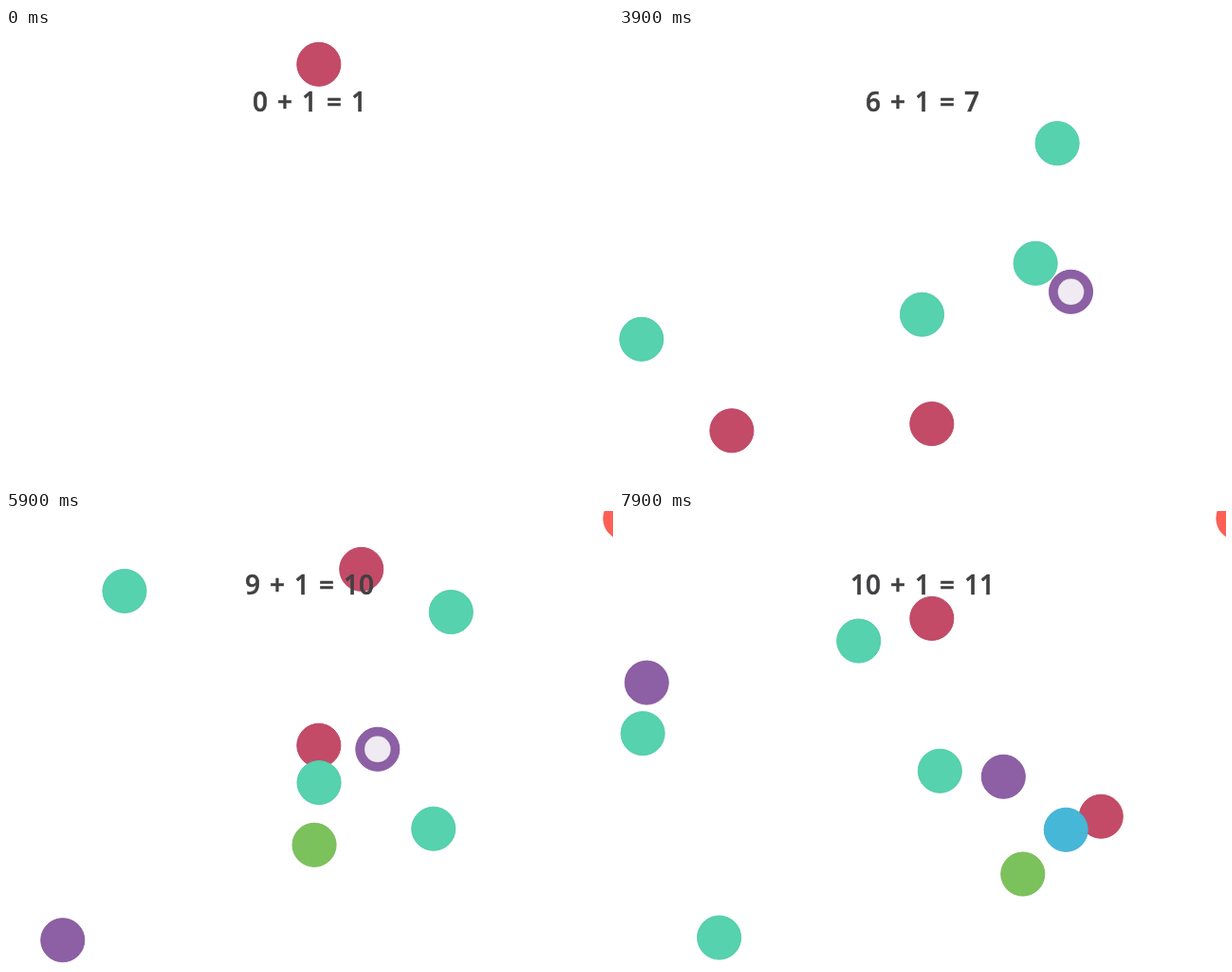
These frames come from a looping animation (640x480 px, 8 s). An HTML page with a canvas:

```html
<!DOCTYPE html>
<html lang="en">
<head>
<meta charset="utf-8">
<title>Counting balls</title>
<style>
  html, body { margin: 0; width: 100%; height: 100%; overflow: hidden; background: #fff; }
  canvas { display: block; }
</style>
</head>
<body>
<canvas id="stage" width="640" height="480"></canvas>
<script>
const ctx = document.getElementById('stage').getContext('2d');
const LOOP = 8000, STEP = 100;
const R = 23.5, EDGE = 23.3, ROOM_W = 594, ROOM_H = 434;
const DRAG = 0.012;   // share of speed lost per step
const HOLD = 1.5;     // steps between touching down and letting go
const CRIMSON = '#c34b68', TEAL = '#56d2ae', PURPLE = '#8d5fa5',
      LIME = '#7cc25c', ORANGE = '#ff5f55', BLUE = '#47b7d8';

// free: step of release; x, y: place at release, from the walls;
// vx, vy: speed per step; stuck: step at which it lodges in a corner
const ball = (color, free, x, y, vx, vy, stuck) =>
  ({ color, free, x, y, vx, vy, stuck, born: Math.max(0, free - HOLD) });

const balls = [
  ball(CRIMSON, 1.15, 306.5, 15, 0, 15.08),
  ball(TEAL, 9.5, 275.2, 310.1, 0.845, -1.255),
  ball(CRIMSON, 15.8, 419.9, 243.1, 33.21, -31.83),
  ball(TEAL, 23.95, 464, 252, 194.94, -97.68),
  ball(TEAL, 34, 565.3, 118.9, -116.39, -140.51),
  ball(TEAL, 36.5, 411.1, 23.4, 137.28, -49.43),
  ball(PURPLE, 39, 453.2, 255, 172.9, 205.59),
  ball(LIME, 42, 410.8, 138.6, -238.85, 181.71),
  ball(ORANGE, 44.4, 113, 157, 216.6, -72.3, 46.82),
  ball(PURPLE, 59, 368.5, 228, 0.76, 1.63),
  ball(BLUE, 71.2, 459, 275, -1.48, 5.1)
];

// Reflects a straight path between two walls
function bounce(u, size) {
  const m = Math.abs(u) % (2 * size);
  return m > size ? 2 * size - m : m;
}

function place(b, n) {
  const age = Math.max(0, Math.min(n, b.stuck || n) - b.free);
  const glide = (1 - Math.exp(-DRAG * age)) / DRAG;
  const x = b.x + b.vx * glide, y = b.y + b.vy * glide;
  return b.stuck
    ? [EDGE + x, EDGE + y]
    : [EDGE + bounce(x, ROOM_W), EDGE + bounce(y, ROOM_H)];
}

function disc(x, y, r, fill, line) {
  ctx.beginPath();
  ctx.arc(x, y, r, 0, Math.PI * 2);
  ctx.fillStyle = fill;
  ctx.fill();
  ctx.strokeStyle = line;
  ctx.lineWidth = 1;
  ctx.stroke();
}

function label(text) {
  ctx.font = '600 28px "Open Sans", "Noto Sans", sans-serif';
  ctx.wordSpacing = '2.7px';
  ctx.textAlign = 'center';
  ctx.fillStyle = ctx.strokeStyle = '#404042';
  ctx.lineWidth = 0.5;
  ctx.fillText(text, 320, 88);
  ctx.strokeText(text, 320, 88);
}

function draw(n) {
  ctx.fillStyle = '#fff';
  ctx.fillRect(0, 0, 640, 480);

  const live = balls.filter(b => b.born <= n);
  for (const b of live) {
    const [x, y] = place(b, n);
    disc(x, y, R - 0.5, b.color, 'rgba(0,0,0,.1)');
    disc(x, y, R - 0.5, 'transparent', b.color);
    if (b.born > 0 && n < b.free + 0.3)
      disc(x, y, 14, 'rgba(255,255,255,.87)', 'rgba(0,0,0,.18)');
  }
  label(`${live.length - 1} + 1 = ${live.length}`);
}

function tick() {
  draw(Math.floor(performance.now() % LOOP / STEP));
  requestAnimationFrame(tick);
}
tick();
</script>
</body>
</html>
```
